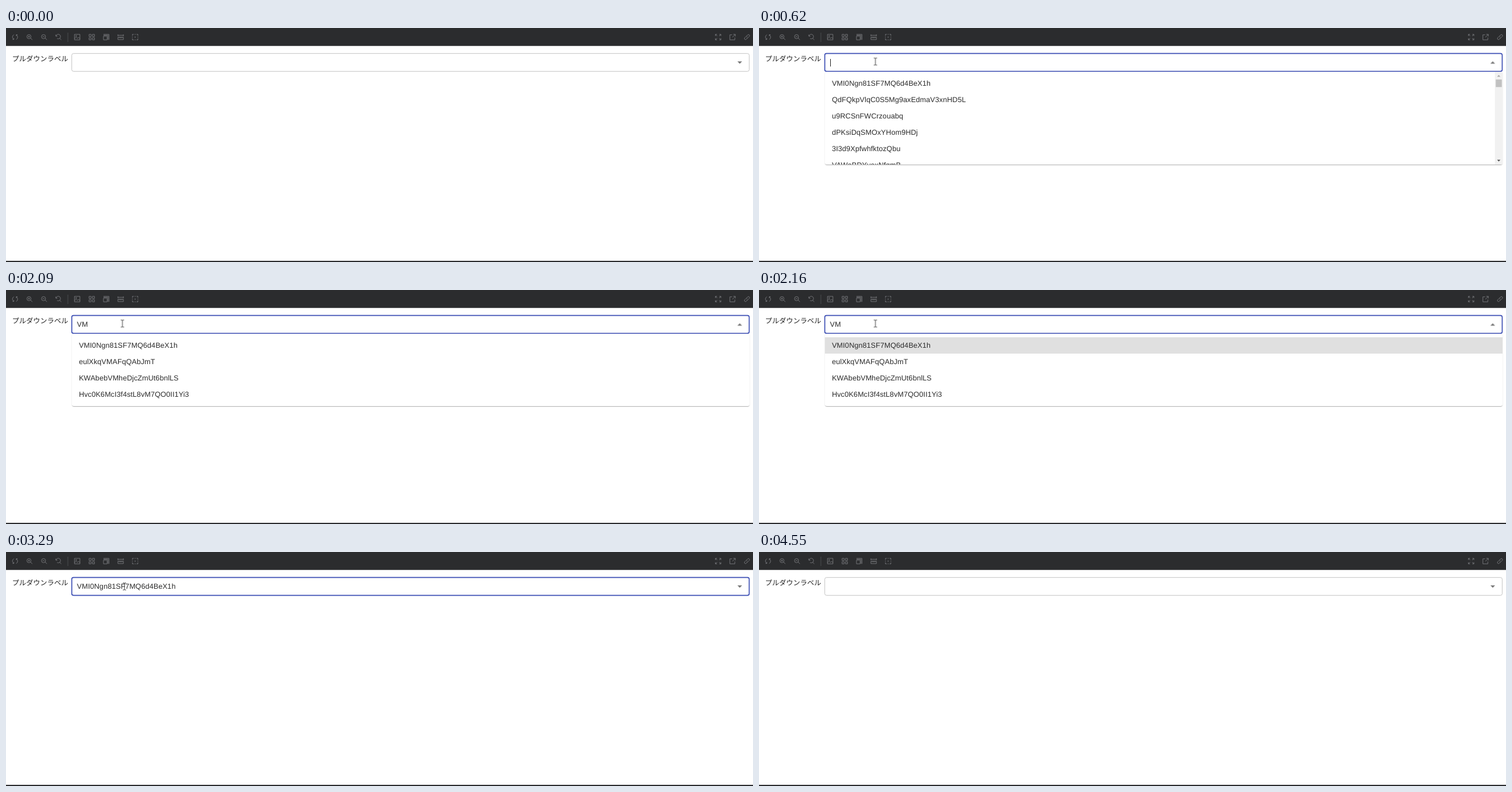
Recreate the animation shown at these times as an HTML page. Size 1280 px wide and 401 px high, loop 4.62 s.

```html
<!DOCTYPE html>
<html lang="ja">
<head>
<meta charset="utf-8">
<title>Autocomplete</title>
<style>
html, body { margin: 0; width: 100%; height: 100%; overflow: hidden; background: #fff; }
#stage { position: relative; width: 1280px; height: 401px; overflow: hidden; background: #fff; }
#stage > * { position: absolute; }
svg { left: 0; top: 0; width: 1280px; height: 401px; }
.label, .value, li {
  font: 12.44px/28px "Liberation Sans", Arial, sans-serif;
  letter-spacing: .117px;
  color: #2b2b2b;
  white-space: pre;
  text-rendering: geometricPrecision;
}
.label { left: 10.6px; top: 39px; font: 12px/28px "Noto Sans CJK JP", "Noto Sans CJK", sans-serif; letter-spacing: 0; color: #212121; }
.value { left: 121.5px; top: 45px; }
.menu {
  left: 112.5px; top: 74.7px; width: 1161.3px; overflow: hidden;
  background: #fff; border-radius: 3px;
  box-shadow: 0 1.6px .8px -.8px #0003, 0 .8px .8px #00000024, 0 .8px 2.4px #0000001f;
}
.long { height: 159.8px; }
.short { height: 124.4px; }
ul { position: absolute; left: 0; right: 0; top: 6.2px; margin: 0; padding: 0; list-style: none; }
li { height: 28px; padding-left: 12.4px; }
.bar { left: auto; right: 0; top: 0; width: 13.3px; height: 160px; position: absolute; }

/* Everything runs on one clock and switches without tweening. */
.a { animation: 4.62s step-end infinite; }
.frame { fill: none; stroke: #c4c4c4; animation-name: frame; }
.drop { fill: #757575; transform-origin: 1257.3px 59.2px; animation-name: drop; }
.long { animation-name: long; }
.all { animation-name: all; }
.v { animation-name: v; }
.short { animation-name: short; }
.pick { animation-name: pick; }
.value.one { animation-name: v; }
.value.two { animation-name: short; }
.value.full { animation-name: full; }
.caret { fill: #222; animation-name: caret; }
.mouse { animation-name: mouse; }
.beam { fill: none; stroke: #222; stroke-width: .9; animation-name: beam; }
.arrow { fill: #fff; stroke: #222; stroke-width: .9; animation-name: arrow; }

@keyframes frame {
  0% { stroke: #c4c4c4; stroke-width: 1px; }
  5.844% { stroke: #212121; stroke-width: 1px; }
  13.419% { stroke: #3f51b5; stroke-width: 1.7px; }
  98.484%, 100% { stroke: #c4c4c4; stroke-width: 1px; }
}
@keyframes drop {
  0%, 55.411%, 100% { transform: none; }
  13.419% { transform: rotate(180deg); }
}
@keyframes long { 0%, 33.766%, 100% { visibility: hidden; } 13.419% { visibility: visible; } }
@keyframes all { 0%, 20.562%, 100% { visibility: hidden; } 13.419% { visibility: visible; } }
@keyframes v { 0%, 33.766%, 100% { visibility: hidden; } 20.562% { visibility: visible; } }
@keyframes short { 0%, 55.411%, 100% { visibility: hidden; } 33.766% { visibility: visible; } }
@keyframes pick { 0%, 55.411%, 100% { background: none; } 46.753% { background: #e0e0e0; } }
@keyframes full { 0%, 98.484%, 100% { visibility: hidden; } 55.411% { visibility: visible; } }
@keyframes caret {
  0% { opacity: 0; transform: translateX(122px); }
  13.419% { opacity: 1; transform: translateX(122px); }
  20.562% { opacity: 1; transform: translateX(130px); }
  32.467% { opacity: 0; transform: translateX(130px); }
  33.766% { opacity: 1; transform: translateX(140px); }
  45.238% { opacity: 0; transform: translateX(140px); }
  55.411% { opacity: 1; transform: translateX(290px); }
  66.883% { opacity: 0; transform: translateX(290px); }
  78.138% { opacity: 1; transform: translateX(290px); }
  89.826%, 100% { opacity: 0; transform: translateX(290px); }
}
@keyframes mouse {
  0%, 1.515% { transform: translate(470px, 250px); }
  3.03% { transform: translate(352px, 165px); }
  4.329% { transform: translate(268px, 100px); }
  5.844% { transform: translate(222px, 62px); }
  7.359% { transform: translate(203px, 47px); }
  8.874% { transform: translate(199.5px, 51px); }
  11.904% { transform: translate(199.5px, 57.5px); }
  71.212% { transform: translate(203px, 59px); }
  72.51% { transform: translate(232px, 67px); }
  74.025% { transform: translate(318px, 96px); }
  75.324% { transform: translate(460px, 142px); }
  76.839% { transform: translate(655px, 203px); }
  78.138% { transform: translate(862px, 268px); }
  79.437% { transform: translate(1049px, 328px); }
  80.952% { transform: translate(1148px, 368px); }
  82.467%, 100% { transform: translate(1200px, 390px); }
}
@keyframes beam { 0%, 74.025%, 100% { visibility: hidden; } 5.844% { visibility: visible; } }
@keyframes arrow {
  0%, 5.844%, 83.982%, 100% { visibility: hidden; }
  1.515%, 74.025% { visibility: visible; }
}
</style>
</head>
<body>
<div id="stage">
  <svg viewBox="0 0 1280 401">
    <path fill="#2b2c2e" d="M0 0H1280V30.7H0ZM0 399H1280V401H0Z"/>
    <path stroke="#4b4c4f" d="M106 8V24"/>
    <g id="icons" fill="none" stroke="#85878a"></g>
    <rect class="a frame" x="112.7" y="43.7" width="1160.8" height="30.6" rx="3"/>
    <path class="a drop" d="M1253.3 57.2h8l-4 4z"/>
  </svg>

  <div class="label">プルダウンラベル</div>
  <div class="a value one">V</div>
  <div class="a value two">VM</div>
  <div class="a value full">VMI0Ngn81SF7MQ6d4BeX1h</div>

  <div class="a menu long">
    <ul class="a all">
      <li>VMI0Ngn81SF7MQ6d4BeX1h</li>
      <li>QdFQkpVlqC0S5Mg9axEdmaV3xnHD5L</li>
      <li>u9RCSnFWCrzouabq</li>
      <li>dPKsiDqSMOxYHom9HDj</li>
      <li>3I3d9XpfwhfktozQbu</li>
      <li>VAWoBDYyexNfqmB</li>
    </ul>
    <ul class="a v">
      <li>VMI0Ngn81SF7MQ6d4BeX1h</li>
      <li>QdFQkpVlqC0S5Mg9axEdmaV3xnHD5L</li>
      <li>VAWoBDYyexNfqmB</li>
      <li>sCOdhlhiFT56VxCkbSBKT5Z8uQ09</li>
      <li>2VeiyWfPgzhsr8XNp4nBIAcWNhv</li>
      <li>VTubQbjiGwfDNtZo9FsN</li>
    </ul>
    <svg class="bar" viewBox="0 0 13.3 160">
      <path fill="#f1f1f1" d="M0 0H13.3V160H0Z"/>
      <path fill="#c1c1c1" d="M1.5 13.3h10.3v13H1.5Z"/>
      <path fill="#a3a3a3" d="M3.8 8.4h5.6l-2.8-3z"/>
      <path fill="#505050" d="M3.8 150.7h5.6l-2.8 3z"/>
    </svg>
  </div>
  <div class="a menu short">
    <ul>
      <li class="a pick">VMI0Ngn81SF7MQ6d4BeX1h</li>
      <li>eulXkqVMAFqQAbJmT</li>
      <li>KWAbebVMheDjcZmUt6bnlLS</li>
      <li>Hvc0K6McI3f4stL8vM7QO0II1Yi3</li>
    </ul>
  </div>

  <svg viewBox="0 0 1280 401">
    <rect class="a caret" y="53" width="1" height="13"/>
    <g class="a mouse">
      <path class="a beam" d="M-2.8-6H-.9L0-5.4L.9-6H2.8M0-5.4V5.4M-2.8 6H-.9L0 5.4L.9 6H2.8"/>
      <path class="a arrow" d="M.5 .7V12.6L3.2 10.1L5 14.2L6.9 13.4L5.1 9.3H8.7Z"/>
    </g>
  </svg>
</div>
<script>
// Toolbar icons on a 14-unit grid, keyed by centre x.
const lens = "M10 6A4.5 4.5 0 1 1 1 6A4.5 4.5 0 1 1 10 6M9 9.2L13 13M3.5 6H7.5";
const icons = {
  15.5: "M4.5 1.8A5.7 5.7 0 0 0 4 11.8M1.5 12.2H4.3V9.3M9.5 12.2A5.7 5.7 0 0 0 10 2.2M12.5 1.8H9.7V4.7",
  40.5: lens + "M5.5 4V8",
  65.5: lens,
  90: "M1 1.5V5H4.5M1.5 4.8A5 5 0 1 1 4 10.2M9.5 9.5L13 13",
  122: "M1 1H13V13H1ZM1 10.5L4.5 7L7.5 10L10 7.5L13 10.5M4 3.8H5.5V5.2H4Z",
  147: "M1 1H5.6V5.6H1ZM8.4 1H13V5.6H8.4ZM1 8.4H5.6V13H1ZM8.4 8.4H13V13H8.4Z",
  171.7: "M1 5H9V13H1ZM1 3H11V13M1 1H13V13",
  196.5: "M1 7H13V12.5H1ZM4 7V9.5M7 7V9.5M10 7V9.5M1 3H13M1 1V5M13 1V5",
  221.3: "M1 4V1H4M6 1H8M10 1H13V4M13 6V8M13 10V13H10M8 13H6M4 13H1V10M1 8V6M6 7H8M7 6V8",
  1220.3: "M1 4.5V1H4.5M1 1L5 5M9.5 1H13V4.5M13 1L9 5M1 9.5V13H4.5M1 13L5 9M13 9.5V13H9.5M13 13L9 9",
  1245: "M6 2H1V13H12V8M8.5 1H13V5.5M13 1L6.5 7.5",
  1269.7: "M6.2 4.5L8.5 2.2A2.4 2.4 0 0 1 12 5.6L9.3 8.3A2.4 2.4 0 0 1 6 8.3M7.8 9.5L5.5 11.8A2.4 2.4 0 0 1 2 8.4L4.7 5.7A2.4 2.4 0 0 1 8 5.7"
};
document.getElementById("icons").innerHTML = Object.entries(icons).map(([x, d]) =>
  `<path transform="translate(${x} 15.6) scale(.78) translate(-7 -7)" d="${d}"/>`).join("");
</script>
</body>
</html>
```
